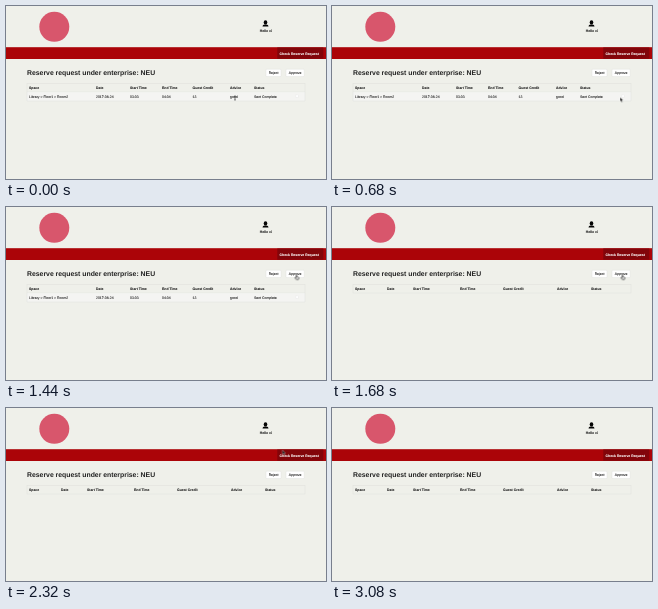
An HTML page for the animation above (3200 ms loop, 320 by 173 pixels).

```html
<!DOCTYPE html>
<html lang="en">
<head>
<meta charset="utf-8">
<title>Reserve request</title>
<style>
  html, body { margin: 0; width: 100%; height: 100%; overflow: hidden; background: #eff0ea; }
  svg { display: block; width: 100vw; height: 100vh; }
  text {
    font: 3.45px "Liberation Sans", Arial, sans-serif;
    fill: #222; stroke: #222; stroke-width: .08;
    text-rendering: geometricPrecision;
  }
  .b { font-weight: bold; }
  .title { font-size: 6.87px; stroke: none; }
  .light { fill: #fff; stroke: #fff; }
  .mid { text-anchor: middle; }
  .line { stroke: #dfe0dc; stroke-width: .5; fill: none; }
  .button { fill: #fff; stroke: #dcdcd8; stroke-width: .4; }

  .full, .empty, .ring, .arrow, .beam, .hand, .cursor {
    animation: 3200ms step-end infinite;
  }
  .full { animation-name: full; }
  .empty { animation-name: empty; }
  .ring { animation-name: select; }
  .beam { animation-name: beam; }
  .arrow { animation-name: arrow; }
  .hand { animation-name: hand; }
  .cursor { animation-name: move; animation-timing-function: ease-in-out; }

  @keyframes full { 0% { opacity: 1 } 48.75%, 100% { opacity: 0 } }
  @keyframes empty { 0% { opacity: 0 } 48.75%, 100% { opacity: 1 } }
  @keyframes select { 0% { opacity: 0 } 7.5% { opacity: 1 } 12.5%, 100% { opacity: 0 } }
  @keyframes beam { 0% { opacity: 1 } 12.5%, 100% { opacity: 0 } }
  @keyframes arrow {
    0% { opacity: 0 } 12.5% { opacity: 1 }
    42.5% { opacity: 0 } 58.75% { opacity: 1 } 87.5%, 100% { opacity: 0 }
  }
  @keyframes hand { 0% { opacity: 0 } 42.5% { opacity: 1 } 58.75%, 100% { opacity: 0 } }
  @keyframes move {
    0% { transform: translate(229px, 92px) }
    7.5%, 12.5% { transform: translate(230px, 91px) }
    18.75% { transform: translate(288px, 91px) }
    30%, 36.25% { transform: translate(289.5px, 94.3px) }
    45%, 55% { transform: translate(290.5px, 68.3px) }
    64%, 68% { transform: translate(286px, 57px) }
    78.75%, 100% { transform: translate(260px, 16.5px) }
  }
</style>
</head>
<body>
<svg viewBox="0 0 320 173" preserveAspectRatio="none">
  <rect width="320" height="173" fill="#eff0ea"/>
  <circle cx="48.3" cy="20.8" r="15" fill="#d8566c"/>

  <g fill="#050505">
    <ellipse cx="259.5" cy="16.4" rx="1.8" ry="2.1"/>
    <path d="M256.6 20.6v-.7q0-1.1 2-1.5h1.8q2 .4 2 1.5v.7z"/>
  </g>
  <text class="b mid" x="259.8" y="26.2">Hello vi</text>

  <rect y="41.2" width="320" height="11.8" fill="#ab0408"/>
  <rect x="271.3" y="41.5" width="46" height="11.2" fill="#82050a"/>
  <text class="b mid light" x="293.2" y="48.5">Check Reserve Request</text>

  <text class="b title" x="21" y="69.2">Reserve request under enterprise: NEU</text>
  <rect class="button" x="260" y="63.2" width="15" height="7.4" rx=".8"/>
  <rect class="button" x="280" y="63.2" width="18.2" height="7.4" rx=".8"/>
  <text class="mid" x="267.5" y="68.2">Reject</text>
  <text class="mid" x="289.1" y="68.2">Approve</text>

  <rect class="line" x="21" y="77.3" width="278" height="8.7"/>
  <g class="full">
    <rect x="21" y="86.2" width="278" height="8.8" fill="#f4f4f2"/>
    <path class="line" d="M21 86V95H299V86"/>
    <rect x="289.8" y="88.8" width="2.6" height="2.6" rx=".4" fill="#fff" stroke="#d8d8d8" stroke-width=".3"/>
    <g id="fullHead"></g>
    <g id="row"></g>
  </g>
  <g class="empty" id="emptyHead"></g>

  <g class="ring">
    <rect x="224.2" y="88.8" width="7.6" height="4.2" fill="#b7d2ee" opacity=".6"/>
    <circle cx="223" cy="91" r="2" fill="none" stroke="#e2413f" stroke-width=".7"/>
  </g>
  <g class="cursor">
    <path class="arrow" d="M0 0V4.2L1 3.3L1.7 4.9L2.4 4.6L1.7 3.1H3z" fill="#111" stroke="#fff" stroke-width=".3"/>
    <path class="beam" d="M-.7 -2.2Q0 -2.2 0 -1.7V1.7Q0 2.2 -.7 2.2M.7 -2.2Q0 -2.2 0 -1.7M0 1.7Q0 2.2 .7 2.2" fill="none" stroke="#222" stroke-width=".6"/>
    <path class="hand" d="M-.4 0Q0 -.6 .4 0V1.5L2 1.9Q2.6 2.1 2.4 3L2 4.2H-.3L-1.6 2.5Q-1.4 1.8 -.4 2.5z" fill="#eee" stroke="#222" stroke-width=".6"/>
  </g>
</svg>
<script>
  const heads = ["Space", "Date", "Start Time", "End Time", "Guest Credit", "Advice", "Status"];
  const cells = ["Library > Floor1 > Room2", "2017-08-24", "03:03", "04:04", "13", "good", "Sent Complete"];
  const wide = [23, 90, 124, 156, 186.5, 224, 248];
  const tight = [23, 55, 81, 128, 171, 225, 259];

  function fill(id, words, xs, y, cls) {
    words.forEach((word, i) => {
      const t = document.createElementNS("http://www.w3.org/2000/svg", "text");
      t.setAttribute("x", xs[i]);
      t.setAttribute("y", y);
      t.setAttribute("class", cls);
      t.textContent = word;
      document.getElementById(id).append(t);
    });
  }

  fill("fullHead", heads, wide, 82.8, "b");
  fill("row", cells, wide, 91.9, "");
  fill("emptyHead", heads, tight, 82.8, "b");
</script>
</body>
</html>
```
